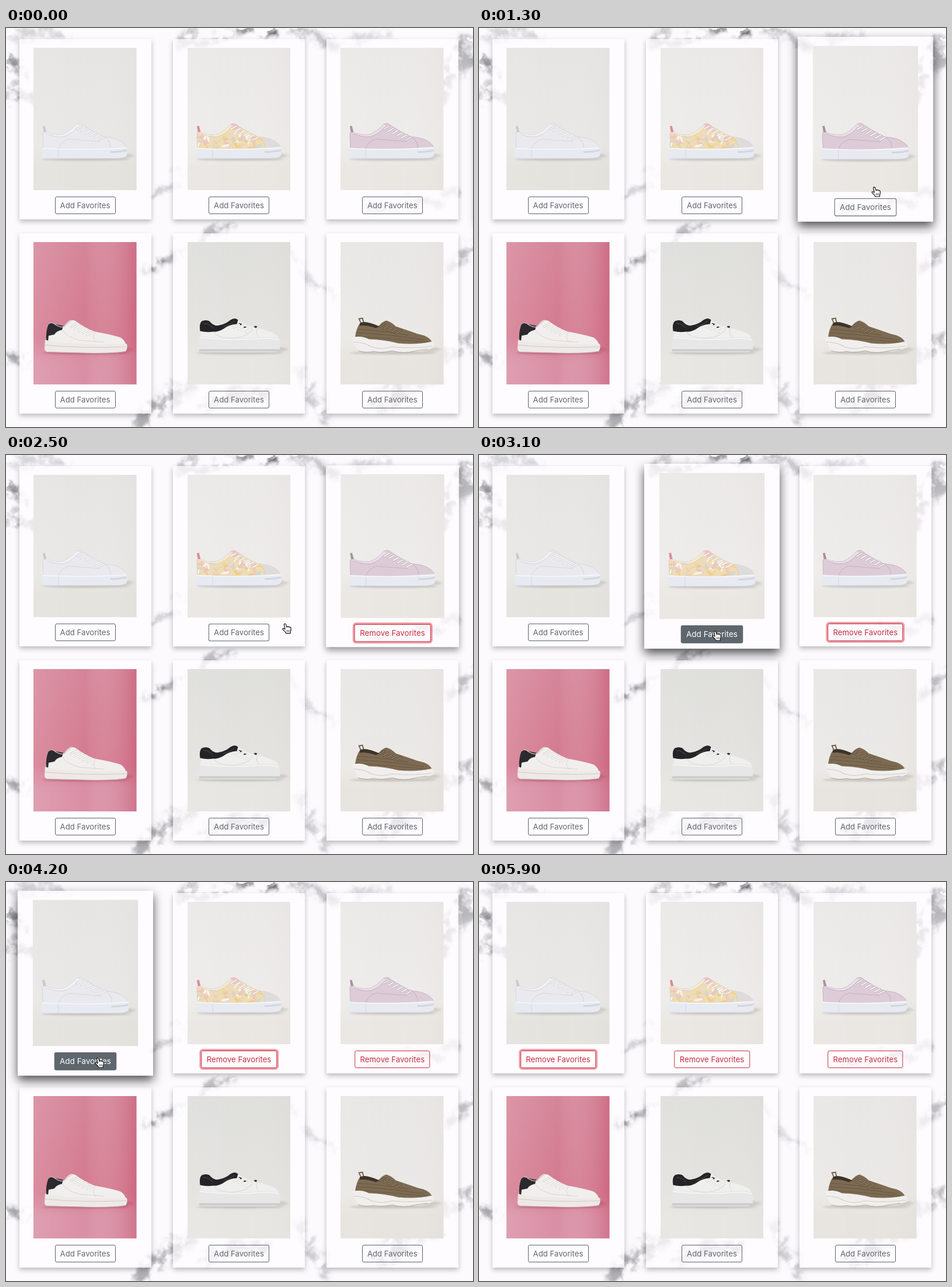
Write an HTML page that moves like this. It is 800 px wide and 684 px high and loops after 6000 ms.

```html
<!DOCTYPE html>
<html lang="en">
<head>
<meta charset="utf-8">
<title>Favorites</title>
<style>
html, body { margin: 0; width: 100%; height: 100%; overflow: hidden; background: #fcfafd; }
#stage { position: absolute; left: 0; top: 0; width: 800px; height: 684px; overflow: hidden; }
#marble, #pointer { position: absolute; left: 0; top: 0; }
.card { position: absolute; width: 226px; height: 309px; background: rgba(255, 253, 255, .72); }
.card svg { position: absolute; left: 24.5px; top: 15px; width: 176.5px; height: 244.5px; }
.btn {
  position: absolute; top: 270px; left: 50%; height: 30px; box-sizing: border-box;
  transform: translateX(-50%); border: 1px solid; border-radius: 3px;
  font: 13.2px/28px Inter, Roboto, sans-serif; text-align: center; white-space: nowrap;
}
</style>
</head>
<body>
<div id="stage">
  <svg id="marble" width="800" height="684">
    <filter id="vein" filterUnits="userSpaceOnUse" x="0" y="0" width="800" height="684" color-interpolation-filters="sRGB">
      <feTurbulence type="fractalNoise" baseFrequency=".024" numOctaves="5" seed="4" result="warp"/>
      <feGaussianBlur in="SourceGraphic" stdDeviation="4" result="soft"/>
      <feDisplacementMap in="soft" in2="warp" scale="42" xChannelSelector="R" yChannelSelector="G" result="bent"/>
      <feTurbulence type="fractalNoise" baseFrequency=".045" numOctaves="4" seed="9"/>
      <feColorMatrix values="0 0 0 0 0  0 0 0 0 0  0 0 0 0 0  4 0 0 0 -1.3" result="grain"/>
      <feComposite in="bent" in2="grain" operator="in"/>
    </filter>
    <g id="veins" filter="url(#vein)" fill="none" stroke="#55555a" stroke-linecap="round"></g>
  </svg>
  <div id="cards"></div>
  <svg id="pointer" width="24" height="24" fill="#fff" stroke="#111" stroke-width="1.2" stroke-linejoin="round" overflow="visible">
    <g id="hand">
      <path d="M5 9L3.6 2.6Q3.4 .7 5 .6Q6.3 .6 6.8 2.2L8 6.3Q9.3 5 10.6 6.2Q12 5.2 13 6.6Q14.8 6.2 15.2 8Q15.8 11 14.6 13.4L14.2 17H6.8Q6 14.4 3 12Q.4 9.8 1.4 8.8Q2.6 7.8 5 10Z"/>
      <path d="M8.4 11.5V14.5M10.4 11.5V14.5M12.4 11.5V14.5" stroke-width=".8"/>
    </g>
    <path id="arrow" d="M5 0V14L8.2 11L10.4 16L12.6 15L10.4 10.2H14.8Z"/>
  </svg>
</div>
<script>
const LOOP = 6000, STEP = 100;
const $ = id => document.getElementById(id);
const clamp = v => Math.max(0, Math.min(1, v));
const smooth = v => v * v * (3 - 2 * v);
const path = (d, fill, more = '') => `<path d="${d}" fill="${fill}" ${more}/>`;
const line = (d, color, w = 1, more = '') => path(d, 'none', `stroke="${color}" stroke-width="${w}" stroke-linecap="round" ${more}`);

function rng(seed) {
  return () => (seed = (seed * 16807) % 2147483647) / 2147483647;
}

// Marble veins: x1, y1, x2, y2, width, opacity
const VEINS = [
  [410, 0, 455, 6, 15, .95], [300, 22, 395, 12, 20, .34], [485, 4, 560, 24, 18, .3],
  [15, 10, 95, 14, 20, .22], [4, 58, 28, 84, 12, .75], [0, 118, 62, 116, 18, .45],
  [60, 100, 130, 40, 14, .2], [800, 28, 735, 128, 34, .4], [770, 60, 705, 150, 16, .3],
  [560, 28, 660, 20, 18, .2], [250, 288, 305, 250, 10, .3], [225, 424, 392, 336, 9, .55],
  [232, 418, 262, 404, 16, .45], [620, 312, 770, 288, 11, .3], [800, 372, 762, 412, 18, .36],
  [480, 372, 560, 470, 8, .26], [0, 562, 42, 570, 14, .55], [235, 668, 305, 618, 30, .45],
  [350, 640, 440, 622, 26, .36], [505, 590, 545, 668, 18, .28], [640, 640, 725, 590, 32, .45],
  [745, 560, 800, 530, 20, .38]
];
$('veins').innerHTML = VEINS.map(([a, b, c, d, w, o]) =>
  `<path d="M${a} ${b}L${c} ${d}" stroke-width="${w}" opacity="${o}"/>`).join('');

function laces(x, y, n, dx, dy, color, edge) {
  let s = '';
  for (let i = 0; i < n; i++) {
    const d = `M${x + i * dx} ${y + i * dy}l9 -5`;
    s += line(d, edge, 3.2) + line(d, color, 2);
  }
  return s;
}

const UPPER = 'M64 208L63 182Q63 177 68 178Q85 184 97 182Q110 177 121 164L128 163Q150 178 168 186Q190 187 200 196Q207 201 207 208Z';

function canvasShoe(fill, tab, edge, print = '') {
  return path('M63 168L66.5 167L69.5 178L65 180Z', tab) +
    path(UPPER, fill, `stroke="${edge}" stroke-width=".7"`) + print +
    path('M68 178Q85 184 97 182Q110 177 121 164L125 167Q113 182 98 186Q83 187 68 180Z', '#fff', 'opacity=".35"') +
    line('M70 181Q84 187 98 186Q112 182 122 170', edge, .8) +
    line('M90 206Q94 194 108 190L160 194', edge, .7) +
    line('M170 187Q181 195 179 206', edge, .8) +
    laces(121, 173, 6, 7.6, 3.7, '#f5f4f6', edge) +
    path('M62 205Q130 209 207 203Q210 212 206 220Q202 223 190 223L66 224Q62 224 62 220Z', '#e7eaf0') +
    line('M63 206Q130 210 206 205', '#f7f8fb', 1.4) +
    line('M64 223.5H190Q203 223 206 220', '#c9ccd3', 1) +
    line('M90 208V223', '#cfd3db', .8) +
    line('M180 212Q196 212 207 209', '#d3d6dd', 3, 'stroke-dasharray=".7 1.6" stroke-linecap="butt"');
}

function floral() {
  const r = rng(77), hues = ['#f2d596', '#efc6bf', '#cbd7e0', '#f6f3ee', '#edcf8d', '#e9d9c9'];
  let s = `<clipPath id="up"><path d="${UPPER}"/></clipPath><g clip-path="url(#up)">`;
  for (let i = 0; i < 75; i++) {
    const x = 64 + r() * 112, y = 166 + r() * 42, a = r() * 180;
    s += `<ellipse cx="${x}" cy="${y}" rx="${3 + r() * 5}" ry="${1 + r() * 1.6}" fill="${hues[i % 6]}" transform="rotate(${a} ${x} ${y})"/>`;
  }
  return s + path('M172 184Q182 196 180 210H210V186Z', '#dddcda') +
    path('M119 165L128 162L136 170L126 175Z', '#efbfc5') + '</g>';
}

const courtShoe = () =>
  path('M68 538L71 511Q74 504 80 505Q92 512 99 511Q106 502 111 500L118 501Q134 513 152 520Q180 525 196 530Q205 535 206 546L68 548Z', '#f1efee') +
  path('M69 536Q68 520 72 509Q76 503 83 507L98 510L96 517Q86 519 83 525L73 527L72 537Z', '#2c2a2e') +
  line('M83 507Q92 513 99 512Q106 505 112 501', '#cfc7c8', 1.4) +
  line('M97 518Q104 530 128 535L168 538', '#d6d0d0', .9) +
  line('M153 521Q146 530 154 538', '#d9d3d3', .9) +
  laces(111, 512, 5, 7, 3.4, '#faf8f8', '#cfc9ca') +
  path('M67 534Q90 540 130 540Q176 543 207 541Q209 548 205 554Q190 557 150 557L72 555Q66 554 66 549Z', '#eee9e7') +
  line('M67 543Q130 549 206 546', '#cfc4c4', .9) +
  line('M70 555L150 557Q190 557 204 554', '#bda7ab', 1);

const chunkShoe = () =>
  path('M333 532L334 512Q342 516 360 518Q370 508 388 500L398 501Q414 512 430 514Q456 520 464 527Q468 533 467 540H332Z', '#efefee') +
  path('M332 519Q330 506 335 502Q342 499 348 502Q356 512 365 509Q376 507 384 500Q392 495 397 500L395 507Q382 508 374 514Q364 521 355 520Q343 522 332 519Z', '#242427') +
  line('M338 506Q346 505 354 514M372 511Q384 508 391 502', '#515156', .9) +
  path('M399 505l5 2l-2 2l-5 -1ZM408 511l4 1l-2 2l-4 -1ZM426 510l4 1l-2 3l-4 -2Z', '#333336') +
  line('M355 521Q362 532 390 531Q412 530 422 517M430 515Q426 526 436 532', '#d2d3d2', .9) +
  laces(390, 513, 4, 7, 2.6, '#fbfbfb', '#cfd0cf') +
  path('M331 528Q380 533 420 531Q450 526 467 532Q471 541 468 551Q466 556 455 556H336Q330 556 330 550Z', '#e6e7e6') +
  line('M332 530Q380 535 420 533Q450 529 466 534', '#f7f7f7', 1.5) +
  line('M332 552H467', '#cbcccb', 4, 'stroke-dasharray="2 2" stroke-linecap="butt"') +
  line('M332 556H462', '#c5c5c3', 1);

const knitShoe = () =>
  line('M609 507L605 498L611 497L613 505', '#6b5a46', 1.8) +
  path('M598 532Q600 514 607 505Q616 503 638 511Q646 502 652 501Q660 503 668 511Q686 517 706 524Q728 528 731 541L690 548L598 538Z', '#7d6a52') +
  path('M607 505Q616 500 640 511L634 514Q617 508 606 510Z', '#3d3329') +
  line('M604 516Q640 518 690 526M601 522Q650 524 716 534M600 528Q650 531 720 538', '#655540', 1.2, 'stroke-dasharray="1.4 1.6" stroke-linecap="butt"') +
  laces(640, 512, 5, 7, 2.8, '#8d7b63', '#544633') +
  path('M594 530Q608 526 622 533Q650 534 672 540Q704 543 730 537Q736 541 733 547Q722 553 700 553Q680 558 662 552Q646 556 628 554Q606 556 601 549Q598 542 594 536Z', '#f1efed') +
  line('M596 538Q614 538 626 546Q644 552 662 546Q690 550 731 545', '#d0cbc6', 1.1) +
  line('M604 553Q616 557 630 554Q646 557 662 553Q680 559 702 553L722 550', '#b3aaa2', 1);

const GREY = ['#e6e5e4', '#e9e8e6', '#e4e3de'], CREAM = ['#ebe9e8', '#eeecea', '#eae7e3'];
const COLS = [22.5, 286, 548.8, 812.2], ROWS = [18.5, 351.5];
const shift = (c, s) => `<g transform="translate(${COLS[c] - COLS[0]} 0)">${s}</g>`;
const ITEMS = [
  { c: 0, r: 0, bg: GREY, art: canvasShoe('#e9e9ee', '#c9c9ce', '#cfcfd6') },
  { c: 1, r: 0, bg: CREAM, art: shift(1, canvasShoe('#efdcb4', '#d98b9c', '#d5cabb', floral())) },
  { c: 2, r: 0, bg: CREAM, art: shift(2, canvasShoe('#ddccd8', '#a8949b', '#b9a7b4')) },
  { c: 0, r: 1, bg: ['#d58599', '#d47a90', '#d98fa5'], art: courtShoe(), pink: true },
  { c: 1, r: 1, bg: ['#dfdfdc', '#e4e3e0', '#e7e6e2'], art: chunkShoe() },
  { c: 2, r: 1, bg: ['#e9e7e5', '#ebe9e6', '#e7e4df'], art: knitShoe() },
  { c: 3, r: 0, bg: CREAM, art: '' }
];

function photo({ c, r, bg, art, pink }, i) {
  const x = COLS[c] + 24.5, y = ROWS[r] + 15, floor = y + (r ? 189 : 190);
  const ink = pink ? '#a84460' : '#a49d96';
  return `<svg viewBox="${x} ${y} 176.5 244.5">
    <defs>
      <linearGradient id="bg${i}" x2="0" y2="1"><stop stop-color="${bg[0]}"/><stop offset=".68" stop-color="${bg[1]}"/><stop offset=".84" stop-color="${bg[2]}"/><stop offset="1" stop-color="${bg[2]}"/></linearGradient>
      <linearGradient id="side${i}"><stop stop-color="#fff" stop-opacity="${pink ? .14 : .05}"/><stop offset=".5" stop-color="#fff" stop-opacity="0"/><stop offset="1" stop-color="${pink ? '#c04a68' : '#cfc9c2'}" stop-opacity="${pink ? .4 : .1}"/></linearGradient>
      <filter id="blur${i}" x="-.3" y="-3" width="1.6" height="7"><feGaussianBlur stdDeviation="3 1.6"/></filter>
    </defs>
    <rect x="${x}" y="${y}" width="176.5" height="244.5" fill="url(#bg${i})"/>
    <rect x="${x}" y="${y}" width="176.5" height="244.5" fill="url(#side${i})"/>
    <g fill="${ink}" filter="url(#blur${i})"><ellipse cx="${x + 90}" cy="${floor + 1}" rx="74" ry="2.4" opacity=".5"/><ellipse cx="${x + 154}" cy="${floor - 5}" rx="17" ry="4" opacity=".35"/></g>
    ${art}</svg>`;
}

$('cards').innerHTML = ITEMS.map((it, i) =>
  `<div class="card" style="left:${COLS[it.c]}px;top:${ROWS[it.r]}px">${photo(it, i)}<div class="btn"></div></div>`).join('');
const cards = [...document.querySelectorAll('.card')];
const btns = cards.map(el => el.querySelector('.btn'));

// Card hover span, button hover start, click time, time the focus moves on
const ACTS = {
  0: { over: [3880, 5400], aim: 3980, click: 4550, blur: 9999 },
  1: { over: [2470, 3800], aim: 2680, click: 3300, blur: 4550 },
  2: { over: [420, 2380], aim: 1500, click: 1720, blur: 3300 },
  6: { over: [-999, 200], aim: 9999, click: 9999, blur: 9999 }
};
const IDLE = { over: [9999, 9999], aim: 9999, click: 9999, blur: 9999 };

// Pointer path: time, x, y
const TRAIL = [
  [0, 850, 190], [300, 797, 215], [500, 765, 235], [800, 742, 256], [1300, 672, 272],
  [1550, 660, 296], [2000, 659, 295], [2200, 650, 292], [2600, 440, 288], [2800, 405, 299],
  [3100, 399, 301], [3500, 400, 302], [3700, 370, 295], [4000, 175, 296], [4200, 152, 301],
  [4800, 153, 300], [5200, 153, 292], [5500, 149, 333]
];
const GONE = 5600;

function pointerAt(t) {
  let i = 1;
  while (i < TRAIL.length - 1 && TRAIL[i][0] < t) i++;
  const [t0, x0, y0] = TRAIL[i - 1], [t1, x1, y1] = TRAIL[i];
  const k = smooth(clamp((t - t0) / (t1 - t0)));
  return [x0 + (x1 - x0) * k, y0 + (y1 - y0) * k];
}

const ramp = (t, a, b, d) => smooth(clamp((t - a) / d)) - smooth(clamp((t - b) / d));

function paintCard(i, t) {
  const act = ACTS[i] || IDLE, [a, b] = act.over;
  const k = ramp(t, a, b, 200), fill = ramp(t, act.aim, b - 60, 150);
  const el = cards[i].style, btn = btns[i], s = btn.style;
  const liked = t >= act.click, focus = liked && t < act.blur;
  el.transform = `scale(${1 + .025 * k})`;
  el.zIndex = k > 0 ? 1 : 0;
  el.boxShadow = `0 ${4 + 4 * k}px ${8 + 8 * k}px rgba(0,0,0,${.25 + .43 * k})`;
  const label = liked ? 'Remove Favorites' : 'Add Favorites';
  if (btn.textContent !== label) btn.textContent = label;
  s.width = (liked ? 129.5 : 104) + 'px';
  const base = liked ? [196, 47, 66] : [99, 103, 108];
  s.color = `rgb(${base.map(v => v + (255 - v) * fill)})`;
  s.borderColor = liked ? '#c62f41' : '#5c646b';
  s.backgroundColor = liked ? `rgba(217,43,60,${fill})` : `rgba(95,103,110,${fill})`;
  s.boxShadow = focus ? '0 0 0 2.8px rgba(220,53,69,.5)' : 'none';
}

function render(t) {
  cards.forEach((_, i) => paintCard(i, t));
  const [x, y] = pointerAt(t), p = $('pointer').style;
  const onCard = y < 331 && COLS.some(c => x + 5 > c && x + 5 < c + 226);
  p.transform = `translate(${x}px,${y}px)`;
  p.zIndex = 2;
  p.display = t < GONE ? 'block' : 'none';
  $('hand').style.display = onCard ? '' : 'none';
  $('arrow').style.display = onCard ? 'none' : '';
}

const start = performance.now();
let last = -1;
function tick() {
  const t = Math.floor((performance.now() - start) % LOOP / STEP) * STEP;
  if (t !== last) render(last = t);
  requestAnimationFrame(tick);
}
tick();
</script>
</body>
</html>
```
